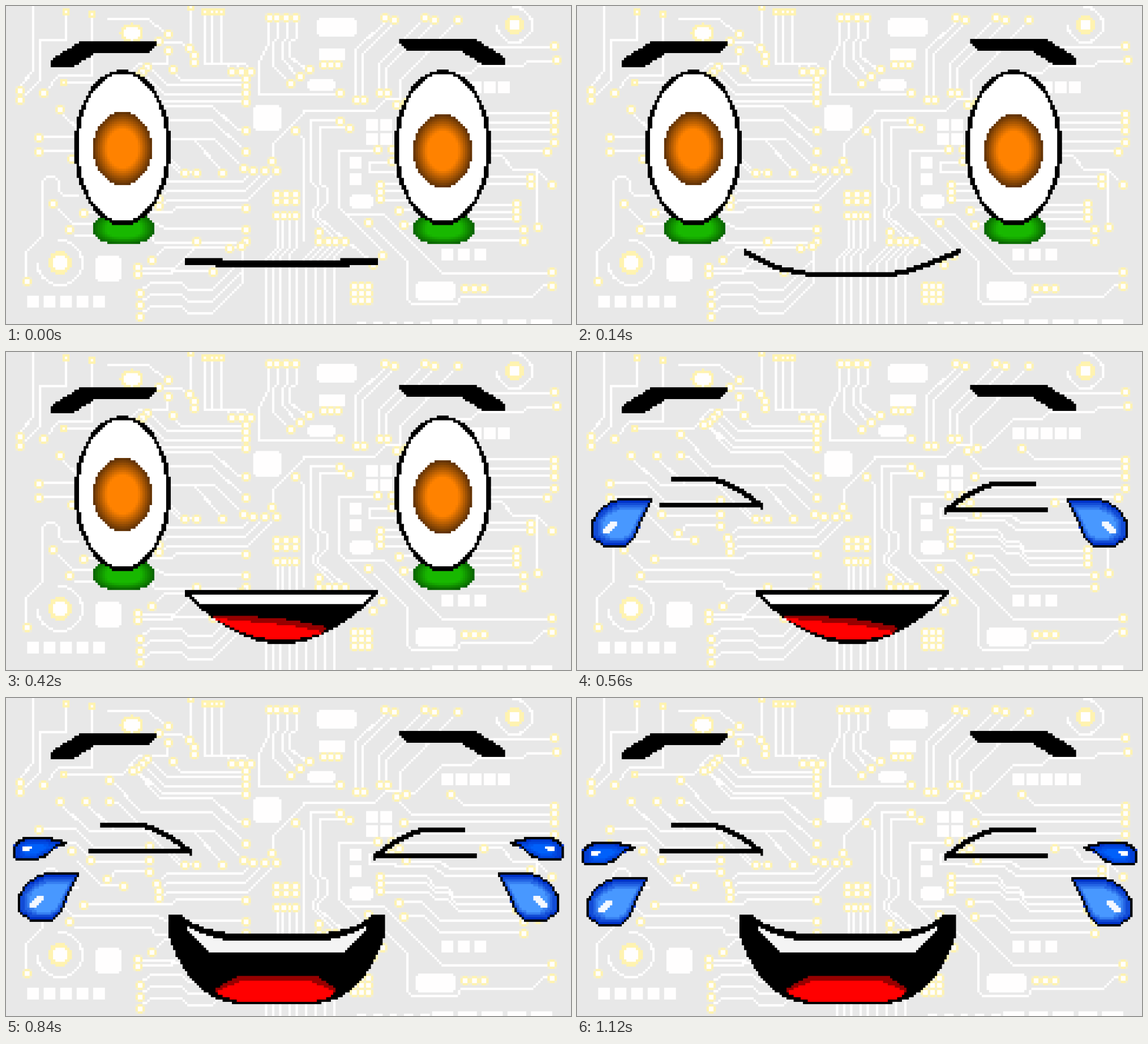
Recreate the animation shown at these times as an HTML page with a canvas. Size 998x561 px, loop 1260 ms.

```html
<!DOCTYPE html>
<html lang="en">
<head>
<meta charset="utf-8">
<title>Laughing circuit face</title>
<style>
html, body { margin: 0; width: 100%; height: 100%; overflow: hidden; background: #e8e8e8; }
canvas { display: block; width: 100vw; height: 100vh; }
</style>
</head>
<body>
<canvas id="stage" width="998" height="561"></canvas>
<script>
// Everything is described in stage units and snapped to a 240 x 135 cell grid.
const W = 240, H = 135, CELL = 998 / W, ZOOM = 8, STEP = 140, STEPS = 9;

function makeLayer(scale = 1) {
  const layer = document.createElement('canvas');
  layer.width = W * scale;
  layer.height = H * scale;
  const context = layer.getContext('2d', { willReadFrequently: scale === 1 });
  context.imageSmoothingEnabled = false;
  return context;
}
const screen = document.getElementById('stage').getContext('2d');
screen.imageSmoothingQuality = 'high';
const board = makeLayer(), face = makeLayer(), scratch = makeLayer(), enlarged = makeLayer(ZOOM);
let target = board;

const edge = v => Math.round(v / CELL);
const middle = v => Math.floor(v / CELL) + .5;
const snapped = (d, snap) => new Path2D(d.replace(/[\d.]+/g, n => snap(+n)));

// Draws a path with hard cell edges: partly covered cells become full or empty.
function paint(color, path, width = 0) {
  scratch.globalCompositeOperation = 'source-over';
  scratch.clearRect(0, 0, W, H);
  scratch.lineWidth = width;
  scratch.lineCap = width === 1 ? 'square' : 'butt';
  if (width) scratch.stroke(path); else scratch.fill(path);
  const image = scratch.getImageData(0, 0, W, H);
  for (let i = 3; i < image.data.length; i += 4) image.data[i] = image.data[i] > 114 ? 255 : 0;
  scratch.putImageData(image, 0, 0);
  scratch.globalCompositeOperation = 'source-in';
  scratch.fillStyle = color;
  scratch.fillRect(0, 0, W, H);
  target.drawImage(scratch.canvas, 0, 0);
}
const shape = (color, d) => paint(color, snapped(d, edge));
const line = (color, d) => paint(color, snapped(d, middle), 1);
const thick = (color, d) => paint(color, snapped(d, edge), 2);

function cells(color, x, y, w, h) {
  target.fillStyle = color;
  target.fillRect(x, y, w, h);
}
function box(color, x1, y1, x2, y2) {
  cells(color, edge(x1), edge(y1), edge(x2) - edge(x1), edge(y2) - edge(y1));
}
function oval(x, y, rx, ry, from = 0, to = 360) {
  const path = new Path2D();
  path.ellipse(x, y, rx, ry, 0, from * Math.PI / 180, to * Math.PI / 180);
  return path;
}
function placed(dx, dy, draw) {
  target.setTransform(1, 0, 0, 1, dx, dy);
  draw();
  target.resetTransform();
}
function mirrored(width, dy, draw) {
  target.setTransform(-1, 0, 0, 1, width, dy);
  draw();
  target.resetTransform();
}

// ---- Circuit board ----
const YELLOW = '#fff3b0', PALE = '#f0edda', WHITE = '#fffefe';
const tracks = new Path2D(), padSpots = [];

const track = d => tracks.addPath(snapped(d, middle));
const pad = (x, y) => padSpots.push([x, y]);

// One or more parallel wires: straight, a diagonal that absorbs the offset, straight.
// bend: share of the straight part before the diagonal; ends: "o" puts a pad there.
function wire(from, to, { bend = 0, ends = 'oo', count = 1, fromStep = [0, 0], toStep = [0, 0], vertical = false } = {}) {
  for (let i = 0; i < count; i++) {
    const [x1, y1] = from.map((v, k) => v + i * fromStep[k]);
    const [x2, y2] = to.map((v, k) => v + i * toStep[k]);
    const dx = x2 - x1, dy = y2 - y1, slant = Math.min(Math.abs(dx), Math.abs(dy));
    if (vertical) {
      const turn = y1 + Math.sign(dy) * (Math.abs(dy) - slant) * bend;
      track(`M${x1} ${y1}V${turn}L${x2} ${turn + Math.sign(dy) * slant}V${y2}`);
    } else {
      const turn = x1 + Math.sign(dx) * (Math.abs(dx) - slant) * bend;
      track(`M${x1} ${y1}H${turn}L${turn + Math.sign(dx) * slant} ${y2}H${x2}`);
    }
    if (ends[0] === 'o') pad(x1, y1);
    if (ends[1] === 'o') pad(x2, y2);
  }
}
function padGrid(x, y, columns, rows, dx, dy) {
  for (let i = 0; i < columns * rows; i++) pad(x + i % columns * dx, y + Math.floor(i / columns) * dy);
}
function drawPads() {
  for (const [px, py] of padSpots) {
    const x = edge(px) - 2, y = edge(py) - 2;
    cells(PALE, x, y, 4, 4);
    cells(YELLOW, x + 1, y, 2, 4);
    cells(YELLOW, x, y + 1, 4, 2);
    cells(WHITE, x + 1, y + 1, 2, 2);
  }
}
function squarePad(px, py) {
  const x = Math.floor(px / CELL), y = Math.floor(py / CELL);
  cells(YELLOW, x - 1, y - 1, 3, 3);
  cells(WHITE, x, y, 1, 1);
}
function chip(x1, y1, x2, y2) {
  box(WHITE, x1 + CELL, y1, x2 - CELL, y2);
  box(WHITE, x1, y1 + CELL, x2, y2 - CELL);
}
function blocks(x, y, count, pitch, w = 21, h = 21) {
  for (let i = 0; i < count; i++) box(WHITE, x + i * pitch, y, x + i * pitch + w, y + h);
}
function via(x, y, rx, ry, hole, halo) {
  const cx = x / CELL, cy = y / CELL;
  paint(YELLOW, oval(cx, cy, rx, ry));
  paint(WHITE, oval(cx, cy, rx * hole, ry * hole));
  if (halo) paint(WHITE, oval(cx, cy, halo, halo, -95, 175), 1);
}

function routeLeft() {
  wire([48, 0], [25, 150], { bend: .9, ends: '-o', vertical: true });
  track('M106 14V60H60V130L25 165');
  track('M153 14V122H92L67 150');
  track('M101 135H205L237 102H286V80');
  pad(25, 166); pad(67, 153); pad(287, 78);
  wire([180, 23], [287, 49], { bend: .9, ends: '-o' });
  wire([270, 64], [326, 75], { bend: .9 });
  wire([326, 0], [326, 75], { ends: '--', vertical: true });
  padGrid(332, 87, 1, 2, 0, 13);
  for (let i = 0; i < 3; i++) track(`M${351 + i * 14} 14V102H${388 + i * 16}L${400 + i * 16} 114`);
  padGrid(400, 116, 3, 1, 16, 0);

  wire([295, 114], [424, 129]);
  wire([250, 107], [424, 141], { count: 3, fromStep: [-9, 9], toStep: [0, 14] });
  wire([225, 128], [365, 177], { ends: 'o-' });
  wire([365, 177], [424, 220], { ends: '-o' });
  wire([183, 145], [365, 202], { ends: 'o-' });
  wire([365, 202], [424, 257], { ends: '-o' });
  wire([95, 183], [370, 235], { count: 2, fromStep: [46, 0], ends: 'o-' });
  wire([183, 183], [337, 295], { bend: .3 });
  wire([330, 235], [382, 295], { count: 2, fromStep: [-40, 35], toStep: [-66, 0], ends: '-o', vertical: true });
  wire([370, 235], [420, 287], { ends: '-o' });
  wire([58, 232], [254, 262], { count: 2, fromStep: [0, 25], toStep: [0, 25], bend: .4 });
  wire([179, 322], [254, 307]);
  wire([125, 290], [208, 332], { ends: '-o' });
  pad(116, 270); pad(150, 285);
  wire([268, 327], [290, 310], { count: 3, fromStep: [1, 14], toStep: [0, 16], ends: 'o-' });
  wire([290, 310], [437, 291], { count: 3, fromStep: [0, 16], toStep: [21, 0], bend: 1, ends: '-o' });
  wire([138, 365], [426, 357], { bend: .55 });
  wire([83, 349], [270, 384], { count: 2, fromStep: [29, 46], toStep: [-15, 21], ends: 'o-' });
  wire([270, 384], [424, 395], { count: 2, fromStep: [-15, 21], toStep: [0, 21], ends: '-o' });
  pad(335, 416);
  track('M36 486V435L65 405V310Q80 292 92 310V325L103 334H125');
  pad(36, 486);

  wire([258, 449], [395, 428]);
  wire([233, 462], [416, 425], { bend: .45 });
  wire([233, 474], [366, 469], { bend: .45 });
  wire([237, 507], [310, 490], { count: 3, fromStep: [0, 20], toStep: [0, 20], ends: 'o-' });
  wire([310, 490], [365, 502], { count: 3, fromStep: [0, 20], toStep: [0, 20], ends: '--' });
  wire([365, 502], [418, 449], { count: 3, fromStep: [0, 20], toStep: [0, 20], ends: '--' });
  wire([418, 425], [418, 489], { ends: '--', vertical: true });
}

function routeCentre() {
  track('M465 21V66L447 100V155H590');
  pad(465, 21); pad(590, 154);
  wire([479, 21], [471, 90], { count: 3, fromStep: [17, 0], toStep: [16, 0], bend: .6, ends: 'o-', vertical: true });
  wire([471, 90], [503, 137], { count: 3, fromStep: [16, 0], toStep: [16, -12], bend: 1, ends: '-o', vertical: true });
  wire([470, 274], [525, 185], { bend: .9, ends: 'o-', vertical: true });
  wire([525, 185], [650, 185], { ends: '--' });
  wire([650, 185], [697, 163], { ends: '--' });
  wire([511, 220], [526, 415], { ends: 'o-', vertical: true });

  wire([590, 203], [540, 203], { count: 2, fromStep: [17, 13], toStep: [16, 13], ends: 'o-' });
  wire([540, 203], [553, 340], { count: 2, fromStep: [16, 13], toStep: [14, 0], bend: .85, ends: '--', vertical: true });
  wire([553, 340], [543, 372], { count: 2, fromStep: [14, 0], toStep: [10, 0], bend: .5, ends: '--', vertical: true });
  wire([543, 372], [585, 415], { count: 2, fromStep: [10, 0], toStep: [64, 42], ends: '-o', vertical: true });
  wire([480, 376], [460, 561], { count: 4, fromStep: [10.5, 0], toStep: [13, 0], bend: .3, ends: '--', vertical: true });
  wire([553, 416], [513, 561], { count: 5, fromStep: [12, 0], toStep: [16.5, 0], bend: .05, ends: '--', vertical: true });
  padGrid(562, 104, 3, 1, 12.5, 0);
  padGrid(478, 332, 3, 2, 16.7, 12.5);
  padGrid(478, 370, 4, 1, 11.6, 0);
  padGrid(553, 414, 4, 1, 15.6, 0);
  padGrid(615, 494, 3, 3, 12.8, 12.6);
  pad(553, 399);
}

function routeRight() {
  wire([670, 21], [619, 167], { count: 2, fromStep: [16, 4], toStep: [13, 0], bend: .05, vertical: true });
  wire([740, 21], [661, 154], { count: 2, fromStep: [17, 4], toStep: [12, 0], bend: .05, vertical: true });
  wire([798, 25], [697, 165], { bend: .1, ends: 'o-', vertical: true });
  wire([707, 170], [822, 118], { bend: .2, ends: 'o-' });
  wire([822, 118], [912, 105], { ends: '--' });
  wire([912, 105], [973, 96], { ends: '-o' });
  wire([840, 71], [969, 71], { ends: '-o' });
  wire([786, 170], [969, 191]);
  wire([690, 175], [969, 204]);
  wire([703, 220], [969, 219]);
  wire([682, 253], [969, 241], { count: 2, fromStep: [13, 13], toStep: [-12, 16] });

  track('M657 255H588V357L600 368H668L770 470H965');
  track('M682 278H642V295H690');
  pad(657, 253); pad(682, 274); pad(965, 470);
  wire([605, 372], [665, 440], { ends: '-o', vertical: true });
  wire([707, 287], [928, 303], { count: 2, fromStep: [-17, 10], toStep: [0, 12], bend: .3, ends: '-o' });
  pad(707, 287);
  wire([844, 266], [900, 289], { bend: .9, ends: 'o-' });
  wire([900, 289], [964, 315], { bend: 1, ends: '-o' });
  wire([937, 289], [939, 391], { ends: '-o', vertical: true });
  wire([661, 316], [780, 336], { count: 3, fromStep: [0, 12.5], toStep: [0, 9], bend: .8, ends: 'o-' });
  wire([780, 336], [902, 350], { count: 3, fromStep: [0, 9], toStep: [0, 12.5], ends: '-o' });
  wire([695, 361], [915, 395], { count: 2, fromStep: [8, 25], toStep: [0, 20], bend: .2 });
  wire([640, 381], [709, 517], { ends: 'o-', vertical: true });
  wire([709, 517], [795, 525], { ends: '--' });
  wire([795, 525], [915, 514], { ends: '--' });
  wire([915, 514], [965, 494], { bend: .5, ends: '-o' });
  padGrid(811, 499, 3, 1, 16.7, 0);
}

function drawBoard() {
  cells('#e8e8e8', 0, 0, W, H);
  routeLeft();
  routeCentre();
  routeRight();
  paint(WHITE, tracks, 1);
  drawPads();
  squarePad(106, 10);
  squarePad(153, 14);
  squarePad(101, 135);
  squarePad(326, 0);
  box(YELLOW, 345, 5, 386, 16);
  blocks(351, 8, 4, 9, 4, 4);

  via(222, 48, 5, 4, .72);
  via(95, 453, 5, 5, .64, 9.7);
  via(898, 33, 4, 4, .56, 7.6);

  chip(549, 21, 619, 54);
  chip(533, 129, 582, 150);
  chip(437, 175, 487, 220);
  chip(158, 441, 203, 486);
  chip(607, 333, 648, 357);
  chip(724, 486, 794, 519);
  blocks(553, 75, 1, 0, 46);
  blocks(37, 511, 5, 29);
  blocks(769, 133, 5, 25);
  blocks(636, 200, 2, 25);
  blocks(636, 224, 2, 25);
  blocks(607, 266, 1, 0);
  blocks(607, 295, 1, 0);
  blocks(769, 428, 3, 29);
  blocks(620, 557, 5, 28, 16, 8);
  blocks(753, 553, 5, 44, 36, 8);
}

// ---- Face ----
const mix = (a, b, t) => `rgb(${a.map((v, i) => Math.round(v + (b[i] - v) * t))})`;

// Oval that darkens towards its rim; higher power gives squarer sides.
function shaded(x, y, w, h, power, core, light, dark) {
  for (let r = 0; r < h; r++) {
    for (let c = 0; c < w; c++) {
      const u = Math.abs((c + .5) * 2 / w - 1), v = Math.abs((r + .5) * 2 / h - 1);
      const d = (u ** power + v ** power) ** (1 / power);
      if (d <= 1) cells(mix(light, dark, Math.max(0, (d - core) / (1 - core))), x + c, y + r, 1, 1);
    }
  }
}
// The same outline repeated, shrinking towards a point and getting lighter.
function nested(d, x, y, smallest, dark, light, layers = 5) {
  const path = snapped(d, edge), cx = x / CELL, cy = y / CELL;
  for (let i = 0; i < layers; i++) {
    const t = i / (layers - 1), scaled = new Path2D();
    scaled.addPath(path, new DOMMatrix().translate(cx, cy).scale(1 - t * (1 - smallest)).translate(-cx, -cy));
    paint(mix(dark, light, t), scaled);
  }
}

function brow() {
  shape('#000', 'M79 97L124 66 137 62H266V70L248 83H156L118 108H79Z');
}
function openEye(dx, irisDrop) {
  placed(dx, 0, () => {
    shaded(37, 88, 26, 13, 2.6, .55, [24, 184, 0], [8, 96, 0]);
    paint('#000', oval(49.5, 60, 20.5, 33));
    paint('#fff', oval(49.5, 60, 18.6, 31.3));
    shaded(37, 45 + irisDrop, 25, 31, 2, .52, [255, 130, 0], [92, 48, 6]);
  });
}
function closedEye() {
  thick('#000', 'M166 224H243Q288 236 330 276');
  thick('#000', 'M146 270H330');
}

const DEEP_BLUE = [0, 50, 200], MID_BLUE = [0, 96, 250], LIGHT_BLUE = [72, 152, 255];
function bigTear() {
  const outline = 'M131 260H77Q40 270 27 300V326L46 343H85Q108 330 112 302L131 262Z';
  nested(outline, 82, 304, .62, DEEP_BLUE, LIGHT_BLUE);
  shape('#f4f8ff', 'M62 299H71V307L56 322H46V312Z');
  line('#000', outline);
}
function smallTear() {
  const outline = 'M106 256L74 248H36Q18 250 14 264V280L20 285H50Q76 280 86 266Z';
  nested(outline, 52, 267, .45, DEEP_BLUE, MID_BLUE);
  shape('#fff', 'M34 262H46V266L38 270H29V266Z');
  line('#000', outline);
}
function tearPair(draw, dx, dy) {
  placed(dx, dy, draw);
  mirrored(W - dx, dy, draw);
}

const smileLine = 'M305 424L350 449Q372 459 425 465H562Q606 459 625 449L686 424';

function flatMouth() {
  box('#000', 316, 445, 383, 457);
  box('#000', 370, 449, 607, 461);
  box('#000', 590, 445, 657, 457);
}
function softSmile() {
  placed(-2, 2, () => thick('#000', smileLine));
}
function toothySmile() {
  const lip = 'M347 449Q374 496 440 507H535Q592 492 620 455';
  shape('#f3f3f3', lip + 'L562 465H425L368 457Z');
  line('#000', 'M374 484H596');
  thick('#000', lip);
  thick('#000', smileLine);
}
function openMouth() {
  shape('#000', 'M316 420H657V428Q566 516 487 516Q408 516 316 428Z');
  shape('#fff', 'M327 428H646L632 445H341Z');
  shape('#960000', 'M362 465H408L480 470 508 476 568 488 556 494 400 480Z');
  shape('#ff0000', 'M366 469L408 473 500 484 562 493Q530 509 487 509Q430 508 366 469Z');
}
function laughingMouth() {
  shape('#000', 'M287 382H308Q350 415 415 415H545Q606 415 648 382H669V422Q628 540 535 540H420Q328 540 287 422Z');
  shape('#f4f4f4', 'M320 402Q362 428 412 428H545Q594 428 636 402V411L595 449H362L320 411Z');
  shape('#960000', 'M366 517L410 491H548L588 517Q560 536 530 536H425Q385 532 366 517Z');
  shape('#ff0000', 'M370 518L416 497H538L582 518Q560 536 530 536H425Q390 532 370 518Z');
}

const mouths = [flatMouth, softSmile, toothySmile, openMouth, openMouth, laughingMouth];
// Tear offsets in cells for each step from the moment the eyes shut.
const tearSteps = [
  { big: [0, 0] },
  { big: [0, 7], small: [2, -3] },
  { big: [-1, 12], small: [0, 0] },
  { big: [-1, 12], small: [0, 0] },
  { big: [-2, 14], small: [-1, 2] }
];

function drawFace(step) {
  target = face;
  target.drawImage(board.canvas, 0, 0);
  brow();
  mirrored(231, -1, brow);
  if (step < 4) {
    openEye(0, 0);
    openEye(136, 1);
  } else {
    closedEye();
    mirrored(235, 2, closedEye);
    const { big, small } = tearSteps[step - 4];
    tearPair(bigTear, ...big);
    if (small) tearPair(smallTear, ...small);
  }
  mouths[Math.min(step, mouths.length - 1)]();

  // Enlarge with hard edges, then reduce to the stage so uneven cell edges blend.
  enlarged.drawImage(face.canvas, 0, 0, W * ZOOM, H * ZOOM);
  screen.drawImage(enlarged.canvas, 0, 0, 998, 561);
}

let shown = -1;
function tick() {
  const step = Math.floor(performance.now() / STEP) % STEPS;
  if (step !== shown) drawFace(shown = step);
  requestAnimationFrame(tick);
}
drawBoard();
tick();
</script>
</body>
</html>
```
